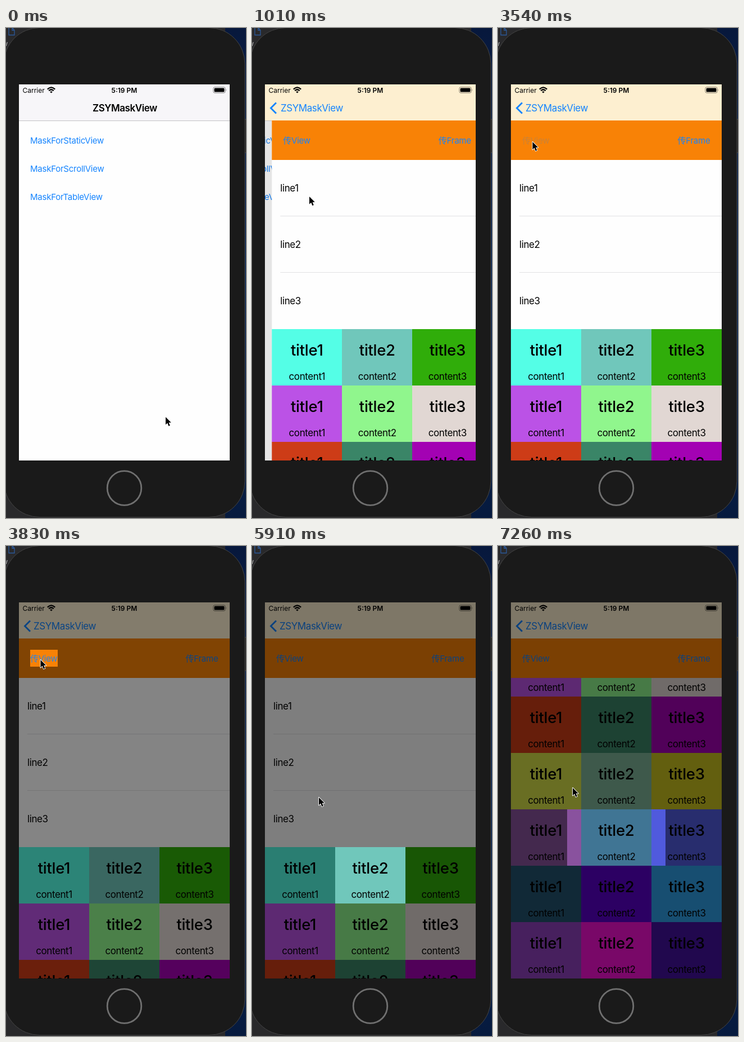
An HTML page that plays this animation: 427 px wide and 869 px high, repeating every 8000 ms.

```html
<!DOCTYPE html>
<html lang="en">
<head>
<meta charset="utf-8">
<title>Mask view demo</title>
<style>
  html, body { margin: 0; width: 100%; height: 100%; overflow: hidden; background: #1a1a1a; }
  svg { display: block; width: 427px; height: 869px; }
  text { font-family: Inter, "Noto Sans CJK SC", "Noto Sans CJK", sans-serif; }
  .status { font-size: 12px; }
  .nav { font-size: 17px; letter-spacing: -.43px; }
  .button { font-size: 15px; letter-spacing: -.24px; fill: #1584fe; }
  .body { font-size: 17px; letter-spacing: -.41px; }
  .title { font-size: 27.5px; font-weight: 500; letter-spacing: -.3px; }
  .center { text-anchor: middle; }
  .bold { font-weight: 600; }
</style>
</head>
<body>
<svg viewBox="0 0 427 869">
  <defs>
    <clipPath id="screen"><rect x="23" y="100" width="375" height="667"/></clipPath>
    <clipPath id="tableArea"><rect x="23" y="234" width="375" height="533"/></clipPath>
    <linearGradient id="wallpaper" x1="0" y1="0" x2="0" y2="1">
      <stop offset="0" stop-color="#07183c"/>
      <stop offset=".5" stop-color="#0a2a5c"/>
      <stop offset="1" stop-color="#061a3e"/>
    </linearGradient>
  </defs>

  <!-- Desktop and phone body -->
  <rect width="427" height="869" fill="url(#wallpaper)"/>
  <rect width="390" height="869" fill="#29292b"/>
  <path d="M5 -1H11L15 4V12.5H5ZM11 -1V4H15" fill="none" stroke="#2b5a9c" stroke-width="1.3"/>
  <text x="-3" y="32" font-size="11" fill="#c8c8c8">v</text>
  <rect x="422.500" y="162" width="8" height="59" fill="#242424" stroke="#4a4a4a"/>
  <rect x="-4" y="-.5" width="429" height="868" rx="64" fill="#1a1a1a" stroke="#444"/>
  <circle cx="210.500" cy="816" r="30.300" fill="#1a1a1a" stroke="#707070" stroke-width="2.800"/>

  <g clip-path="url(#screen)">
    <rect x="23" y="100" width="375" height="667" fill="#fefefe"/>
    <g id="list">
      <text class="button" x="43" y="204.500">MaskForStaticView</text>
      <text class="button" x="43" y="254.500">MaskForScrollView</text>
      <text class="button" x="43" y="304.500" id="tableButton">MaskForTableView</text>
    </g>
    <rect x="23" y="164" width="375" height="603" id="listDim"/>
    <rect x="23" y="164" width="375" height="1" fill="#c2c2c4"/>

    <g id="page">
      <rect x="23" y="164" width="375" height="603" fill="#fefefe"/>
      <rect x="23" y="164" width="375" height="70" fill="#f88206"/>
      <text class="button" x="43" y="204.500" id="viewButton">传View</text>
      <text class="button" x="319.500" y="204.500">传Frame</text>
      <g clip-path="url(#tableArea)"><g id="table"></g></g>
    </g>

    <rect x="23" y="100" width="375" height="64" fill="#f7f6f9"/>
    <rect x="23" y="100" width="375" height="64" fill="#fdefd0" id="barTint"/>
    <text class="nav bold" x="154" y="148" id="navTitle">ZSYMaskView</text>
    <g id="back" fill="#1584fe">
      <path d="M43 132.500L33.500 142L43 151.500" fill="none" stroke="#1584fe" stroke-width="2.900"/>
      <text class="nav" x="49" y="148" id="backLabel">ZSYMaskView</text>
    </g>
    <path id="mask" fill-rule="evenodd"/>

    <!-- Status bar -->
    <text class="status" x="29.500" y="114.500">Carrier</text>
    <g fill="none" stroke="#000" stroke-width="2.200">
      <path d="M73.800 108.600Q80.500 102.200 87.200 108.600"/>
      <path d="M76.200 111.300Q80.500 107.200 84.800 111.300"/>
    </g>
    <path d="M78.200 113.200Q80.500 111.200 82.800 113.200L80.500 115.600Z"/>
    <text class="status bold center" x="210.500" y="114.500">5:19 PM</text>
    <rect x="368.800" y="104.800" width="21.400" height="10.400" rx="2.800" fill="none" stroke="#000" stroke-opacity=".45"/>
    <rect x="370.500" y="106.500" width="18" height="7" rx="1.500"/>
    <path d="M391.300 108.200Q393 110 391.300 111.800Z" opacity=".5"/>
  </g>

  <path id="cursor" d="M0 0V13.500L3.200 10.600L5.400 16L7.800 15L5.600 9.800H9.800Z"
        stroke="#fff" stroke-width="1.800" stroke-linejoin="round" paint-order="stroke"/>
</svg>

<script>
const LOOP = 8000;
const $ = id => document.getElementById(id);
const clamp = v => Math.min(1, Math.max(0, v));
const ease = p => p * p * (3 - 2 * p);
const ramp = (t, from, to) => ease(clamp((t - from) / (to - from)));
const shift = (id, x, y = 0) => $(id).setAttribute('transform', `translate(${x} ${y})`);
const fade = (id, value) => $(id).setAttribute('opacity', value);

const cellColors = [
  '#54fee6 #70c7bb #30ad0a',
  '#bb52e6 #90f68d #e1d7d3',
  '#cd3c17 #3a8567 #a302b3',
  '#d4de46 #7cb498 #c8c01e',
  '#89529e #407594 #505add',
  '#22526e #5800c8 #2e9ee4',
  '#9040be #f411d1 #42109e'
];

function buildTable() {
  let markup = '';
  for (let i = 0; i < 3; i++) {
    const y = 234 + i * 100;
    markup += `<text class="body" x="38" y="${y + 56}">line${i + 1}</text>`;
    if (i < 2) markup += `<rect class="separator" x="38" y="${y + 99}" width="360" height="1" fill="#e2e2e4"/>`;
  }
  cellColors.forEach((row, r) => row.split(' ').forEach((color, c) => {
    const x = 23 + c * 125, y = 534 + r * 100, mid = x + 62.5;
    markup += `<rect x="${x}" y="${y}" width="125" height="100" fill="${color}" shape-rendering="crispEdges"/>
      <text class="title center" x="${mid}" y="${y + 47}">title${c + 1}</text>
      <text class="body center" x="${mid}" y="${y + 89.5}">content${c + 1}</text>`;
  }));
  $('table').innerHTML = markup;
}

const segments = [[1160, 8], [2640, 10], [3540, 6], [5170, 11], [5610, 3], [7260, 11]];
function hold(t) {
  let start = 0;
  for (const [end, count] of segments) {
    const step = (end - start) / count;
    if (t < end - step * .06) return start + Math.floor((t - start) / step + .06) * step;
    start = end;
  }
  return start;
}

const cursorPath = [
  [0, 284, 690], [110, 284, 690], [580, 102, 299], [1465, 102, 299],
  [1750, 120, 309], [2050, 141, 300], [2640, 65, 206], [3090, 61.5, 202],
  [3836, 61.5, 202], [4570, 109, 410], [5020, 109, 410], [5170, 111, 408],
  [5610, 119, 446], [6210, 119, 446], [6810, 133, 429], [LOOP, 133, 429]
];
function cursorAt(t) {
  const i = cursorPath.findIndex(key => key[0] > t);
  const [t0, x0, y0] = cursorPath[i - 1], [t1, x1, y1] = cursorPath[i];
  const p = ramp(t, t0, t1);
  return [x0 + (x1 - x0) * p, y0 + (y1 - y0) * p];
}

// [shown until, x, y, width, height]
const holes = [
  [4700, 43, 184, 49, 30],
  [5890, 23, 334, 375, 100],
  [7090, 148, 534, 125, 100],
  [LOOP, 123, 467, 175, 100]
];

function render(time) {
  const t = hold(time);
  shift('cursor', ...cursorAt(t));

  // Push transition: critically damped spring, rest goes from 1 to 0
  const s = Math.max(0, t - 640) * .014;
  const rest = t > 1290 ? 0 : (1 + s) * Math.exp(-s);
  const done = 1 - rest;
  shift('page', 375 * rest);
  shift('list', -112 * done);
  fade('listDim', .1 * done);
  fade('barTint', clamp(done * 1.03));
  fade('navTitle', clamp(1 - done * 1.6));
  shift('navTitle', -105 * done);
  fade('back', clamp(done * 1.5 - .45));
  shift('backLabel', 60 * rest);
  fade('tableButton', t > 560 && t < 700 ? .2 : 1);
  fade('viewButton', t < 3530 ? 1 : .2 + .8 * ramp(t, 3600, 3900));

  const hole = holes.findIndex(h => t < h[0]);
  const [, x, y, w, h] = holes[hole];
  $('mask').setAttribute('d', `M23 100h375v667h-375ZM${x} ${y}h${w}v${h}h${-w}Z`);
  fade('mask', .5 * ramp(t, 3615, 3865));
  document.querySelectorAll('.separator').forEach(line => line.setAttribute('opacity', hole === 1 ? 0 : 1));
  shift('table', 0, -467 * ramp(t, 6970, 7250));
}

buildTable();
const began = performance.now();
function tick() {
  render((performance.now() - began) % LOOP);
  requestAnimationFrame(tick);
}
tick();
</script>
</body>
</html>
```
